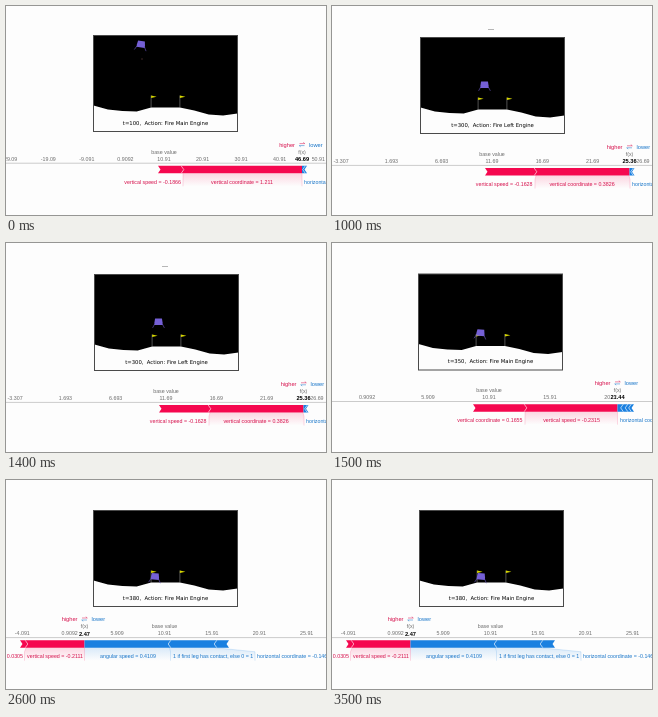
These frames come from a looping animation (320x209 px, 3.6 s). An HTML page:

```html
<!DOCTYPE html>
<html lang="en">
<head>
<meta charset="utf-8">
<title>Lander force plot</title>
<style>
  html, body { margin: 0; width: 100%; height: 100%; overflow: hidden; background: #fdfdfd; }
  svg { display: block; width: 100%; height: 100%; }
  text { white-space: pre; font: 5.3px "Liberation Sans", Arial, sans-serif; }
  .caption { font: 5.3px "DejaVu Sans", sans-serif; }
  .legend { font-size: 5.7px; }
  .output { font-size: 5.7px; font-weight: bold; paint-order: stroke; stroke: #fdfdfd; stroke-width: 1.6px; }
</style>
</head>
<body>
<svg id="stage" viewBox="0 0 320 209" preserveAspectRatio="none"></svg>
<script>
const LOOP = 3600;
const RED = '#f5084f', BLUE = '#1a80e0', RED_TEXT = '#d6104c', BLUE_TEXT = '#1674c8';
const GREY = '#6c6c6c';
const TERRAIN = [70, 74, 75.5, 76, 72, 72, 72, 75, 79, 80, 78];
const BAR_TOP = 2.65, BAR_LOW = 10.15, BAR_MID = (BAR_TOP + BAR_LOW) / 2;

// frame: top-left of the game view; ship: [x, y, tilt]; bar: [start, output, end]
// base: x of the tick at baseValue; red, blue: divider positions
// leaders: [bar x, label x, colour]; labels: [x, anchor, text, colour]
const SCENES = [
  { at: 0, step: 100, engine: 'Main', frame: [87.5, 29.5], ship: [135, 38.5, 8], axis: 157.2,
    sparks: [[136, 53]],
    base: 158, baseValue: 10.9092, spacing: 38.57, gap: 10, output: '46.69', bar: [152, 296, 301],
    red: [176.5], blue: [298], leaders: [[177, 177, RED], [296, 296, RED]],
    labels: [[175, 'end', 'vertical speed = -0.1866', RED_TEXT],
             [236, 'middle', 'vertical coordinate = 1.211', RED_TEXT],
             [298, 'start', 'horizontal coordinate = 0.21', BLUE_TEXT]] },
  { at: 400, step: 200, engine: 'Main', frame: [88.5, 30.5], ship: [147.5, 58.7, 3], axis: 158.2,
    sparks: [[130, 58], [151, 68]],
    base: 159, baseValue: 10.9092, spacing: 53.1, gap: 10, output: '37.11', bar: [154, 298, 302.5],
    red: [161, 191], blue: [300], leaders: [[161, 130, RED], [191, 190, RED], [298, 298, RED]],
    labels: [[128, 'end', 'horizontal speed = 0.1431', RED_TEXT],
             [188.5, 'end', 'vertical speed = -0.1819', RED_TEXT],
             [244.5, 'middle', 'vertical coordinate = 0.7984', RED_TEXT]] },
  { at: 900, step: 300, engine: 'Left', frame: [88.5, 31.5], ship: [152.5, 79, 0], axis: 159.4,
    sparks: [], dash: true,
    base: 160, baseValue: 11.693, spacing: 50.3, gap: 5, output: '25.36', bar: [153, 297.5, 302.5],
    red: [203.5], blue: [300], leaders: [[204, 203, RED], [297, 298, RED]],
    labels: [[200.5, 'end', 'vertical speed = -0.1628', RED_TEXT],
             [250, 'middle', 'vertical coordinate = 0.3826', RED_TEXT],
             [300, 'start', 'horizontal coordinate = 0.04', BLUE_TEXT]] },
  { at: 1500, step: 350, engine: 'Main', frame: [86.5, 31], ship: [148.5, 90, 6], axis: 158.5,
    sparks: [],
    base: 157, baseValue: 10.9092, spacing: 61, gap: 5, output: '21.44', bar: [141, 285.5, 302],
    red: [193.5], blue: [290, 294.5, 298], leaders: [[193, 193, RED], [285.5, 285.5, RED]],
    labels: [[190.5, 'end', 'vertical coordinate = 0.1655', RED_TEXT],
             [239.5, 'middle', 'vertical speed = -0.2315', RED_TEXT],
             [288, 'start', 'horizontal coordinate = -0.1', BLUE_TEXT]] },
  { at: 2600, step: 380, engine: 'Main', frame: [87.5, 30.5], ship: [149, 96.8, 5], axis: 157.6,
    sparks: [],
    base: 158.5, baseValue: 10.9092, spacing: 47.4, gap: 5, output: '2.47', bar: [14, 78.5, 223],
    red: [20.5], blue: [163.5, 209.5],
    leaders: [[20, 18.5, RED], [78.5, 78.5, RED], [163.5, 164.5, BLUE], [209.5, 249, BLUE]],
    labels: [[17, 'end', 'horizontal speed = 0.0305', RED_TEXT],
             [77, 'end', 'vertical speed = -0.2111', RED_TEXT],
             [122, 'middle', 'angular speed = 0.4109', BLUE_TEXT],
             [167, 'start', '1 if first leg has contact, else 0 = 1', BLUE_TEXT],
             [251, 'start', 'horizontal coordinate = -0.1461', BLUE_TEXT]] }
];

const text = (x, y, str, fill, anchor = 'middle', cls = '') =>
  `<text x="${x}" y="${y}" fill="${fill}" text-anchor="${anchor}" class="${cls}">${str}</text>`;
const poly = (points, fill) => `<polygon points="${points}" fill="${fill}"/>`;
const line = (points, stroke, width = 0.6, extra = '') =>
  `<polyline points="${points}" fill="none" stroke="${stroke}" stroke-width="${width}" ${extra}/>`;
const fade = (id, color) =>
  `<linearGradient id="${id}" x2="0" y2="1"><stop stop-color="${color}" stop-opacity=".16"/>
   <stop offset="1" stop-color="${color}" stop-opacity="0"/></linearGradient>`;

function flag(x) {
  return line(`${x},72 ${x},60`, '#ccc', 0.4) +
    poly(`${x},60 ${x},62.6 ${x + 5.5},61.3`, '#d8d800');
}

function ship([x, y, tilt]) {
  const leg = side => line(`${side * 3.8},2 ${side * 5.9},5.9`, '#5c4ba6', 0.7);
  return `<g transform="translate(${x} ${y}) rotate(${tilt})">${leg(-1)}${leg(1)}` +
    poly('-3.4,-3.5 -4.1,.5 -4.1,2.9 4.1,2.9 4.1,.5 3.4,-3.5', '#7560d6') + '</g>';
}

function game(s) {
  const [x, y] = s.frame;
  const ground = TERRAIN.map((h, i) => `${i * 14.4},${h}`).join(' ');
  const spark = ([px, py]) => `<circle cx="${px}" cy="${py}" r=".7" fill="#533"/>`;
  return `<g transform="translate(${x} ${y})">
    <rect width="144" height="96" fill="#000"/>
    ${poly(`${ground} 144,96 0,96`, '#fdfdfd')}${flag(57.6)}${flag(86.4)}
    <rect width="144" height="96" fill="none" stroke="#4a4a4a"/>
    ${text(72, 89, `t=${s.step},  Action: Fire ${s.engine} Engine`, '#000', 'middle', 'caption')}
    </g>` + s.sparks.map(spark).join('') + ship(s.ship);
}

function ticks(s) {
  let out = '';
  for (let i = -4; i <= 4; i++) {
    const x = s.base + i * s.spacing;
    const value = Number((s.baseValue + i * s.gap).toPrecision(4));
    if (x > -15 && x < 335) out += text(x, s.axis - 2.2, value, GREY);
  }
  return out;
}

function chevron(x, axis, dir, color) {
  const back = x - dir * 1.3, tip = x + dir * 1.3;
  return line(`${back},${axis + BAR_TOP} ${tip},${axis + BAR_MID} ${back},${axis + BAR_LOW}`, color, 0.8);
}

function labelArea(s) {
  const low = s.axis + BAR_LOW, bend = low + 4, end = low + 13;
  const leader = ([from, to, color]) =>
    line(`${from},${low} ${to},${bend} ${to},${end}`, color, 0.5, 'opacity=".3"');
  const area = ([from, to, color], i) => {
    if (i === 0) return '';
    const [prevFrom, prevTo] = s.leaders[i - 1];
    return poly(`${prevFrom},${low} ${from},${low} ${to},${bend} ${to},${end} ${prevTo},${end} ${prevTo},${bend}`,
      color === RED ? 'url(#fadeRed)' : 'url(#fadeBlue)');
  };
  return s.leaders.map(area).join('') + s.leaders.map(leader).join('') +
    s.labels.map(([x, anchor, str, color]) => text(x, s.axis + 20.8, str, color, anchor)).join('');
}

function forcePlot(s) {
  const { axis, bar: [start, fx, end] } = s;
  const top = axis + BAR_TOP, mid = axis + BAR_MID, low = axis + BAR_LOW;
  return line(`0,${axis} 320,${axis}`, '#aaa', 0.6) + ticks(s) +
    text(s.base, axis - 9.7, 'base value', GREY) +
    text(fx, axis - 9.7, 'f(x)', GREY) +
    text(fx, axis - 2.1, s.output, '#000', 'middle', 'output') +
    text(fx - 7, axis - 16.7, 'higher', RED_TEXT, 'end', 'legend') +
    text(fx + 7, axis - 16.7, 'lower', BLUE_TEXT, 'start', 'legend') +
    line(`${fx - 2.5},${axis - 19.6} ${fx + 2.8},${axis - 19.6} ${fx + 1.3},${axis - 20.8}`, RED_TEXT, 0.5) +
    line(`${fx + 2.5},${axis - 17.6} ${fx - 2.8},${axis - 17.6} ${fx - 1.3},${axis - 16.4}`, BLUE_TEXT, 0.5) +
    poly(`${start},${top} ${fx},${top} ${fx},${low} ${start},${low} ${start + 2.5},${mid}`, RED) +
    poly(`${fx},${top} ${end},${top} ${end - 2.5},${mid} ${end},${low} ${fx},${low}`, BLUE) +
    s.red.map(x => chevron(x, axis, 1, '#ffc3d5')).join('') +
    s.blue.map(x => chevron(x, axis, -1, '#d1e6fa')).join('') +
    labelArea(s);
}

const stage = document.getElementById('stage');
const defs = `<defs>${fade('fadeRed', RED)}${fade('fadeBlue', BLUE)}</defs>`;
let current = null;

function render(now) {
  const scene = SCENES.findLast(s => s.at <= now % LOOP);
  if (scene !== current) {
    current = scene;
    stage.innerHTML = defs + game(scene) + forcePlot(scene) +
      (scene.dash ? line('156,23.5 162,23.5', '#999', 0.7) : '');
  }
}

const origin = performance.now();
function tick() {
  render(performance.now() - origin);
  requestAnimationFrame(tick);
}
tick();
</script>
</body>
</html>
```
